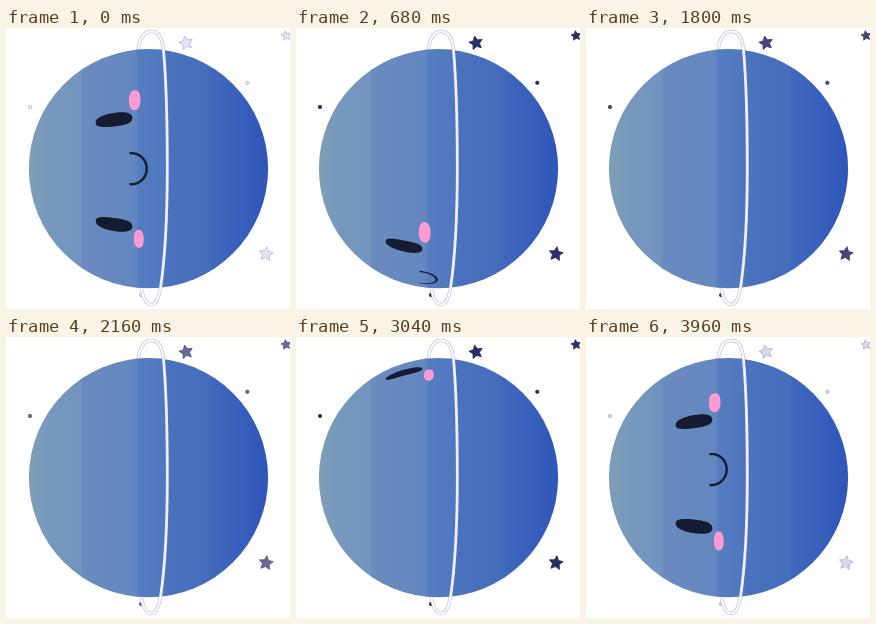
Write an HTML page with a canvas that moves like this. It is 284x281 px and loops after 4000 ms.

```html
<!DOCTYPE html>
<html lang="en">
<head>
<meta charset="utf-8">
<title>Spinning planet</title>
<style>
html, body { margin: 0; width: 100%; height: 100%; overflow: hidden; background: #fff; }
canvas { display: block; width: 284px; height: 281px; }
</style>
</head>
<body>
<canvas id="stage"></canvas>
<script>
const W = 284, H = 281, LOOP = 4000, STEP = 40;
const CX = 142.5, CY = 140.7, R = 119.6;
const INK = '#151b30', PINK = '#ff9bd0';
const RAD = Math.PI / 180;

const canvas = document.getElementById('stage');
const dpr = window.devicePixelRatio || 1;
canvas.width = W * dpr;
canvas.height = H * dpr;
const ctx = canvas.getContext('2d');
ctx.scale(dpr, dpr);

const skin = ctx.createLinearGradient(CX - R, 0, CX + R, 0);
[[23, '#7f9fb6'], [40, '#7799bc'], [74, '#7094be'], [77, '#6a8bbf'],
 [129, '#6387bf'], [133, '#567cc0'], [157, '#5078bf'], [161, '#4b72bd'],
 [203, '#466dbc'], [207, '#4068bc'], [235, '#385fbb'], [262, '#2f55b8']]
  .forEach(([x, color]) => skin.addColorStop(Math.max(0, Math.min(1, (x - CX + R) / (2 * R))), color));

// Closed loop of the ring and its near side.
const ringLoop = new Path2D('M132 22C134 9 138 3.5 145 3.5C153 3.5 156 10 157.5 22' +
  'C160 50 161.3 90 161.3 140C161.3 190 159 230 154.5 260' +
  'C152.5 271 149 276.5 145.5 276.5C140 276.5 137 270 135.3 260');
const ringFront = new Path2D('M157.5 22C160 50 161.3 90 161.3 140C161.3 190 159 230 154.5 260');

// x, y, outer radius, tilt in degrees
const stars = [
  [180, 15, 7.6, -12], [280, 7.7, 5.4, -8], [260, 226, 7.8, 8]
];
const dots = [[24, 79], [241.3, 54.8], [135, 267]];

function mix(a, b, k) {
  return `rgb(${a.map((v, i) => Math.round(v + (b[i] - v) * k))})`;
}

// Points are [x, angle around the horizontal axis]; hidden ones rest on the limb.
function wrap(points, turn, color) {
  ctx.beginPath();
  for (const [x, angle] of points) {
    const a = Math.max(-90, Math.min(90, angle + turn));
    const r = Math.sqrt(R * R - (x - CX) ** 2);
    ctx.lineTo(x, CY + r * Math.sin(a * RAD));
  }
  ctx.closePath();
  ctx.fillStyle = color;
  ctx.fill();
}

function blob(x, angle, rx, ra, power) {
  const soft = v => Math.sign(v) * Math.abs(v) ** (2 / power);
  return Array.from({ length: 60 }, (_, i) => {
    const t = i / 60 * 2 * Math.PI;
    return [x + rx * soft(Math.cos(t)), angle + ra * soft(Math.sin(t))];
  });
}

function smile() {
  const arc = (rx, ra) => Array.from({ length: 41 }, (_, i) => {
    const t = (i / 40 - 0.5) * Math.PI;
    return [125.5 + rx * Math.cos(t), ra * Math.sin(t)];
  });
  const outer = arc(16.4, 8.1), inner = arc(14, 6.95);
  return [[123.5, -8.1], ...outer, [123.5, 8.1], [123.5, 6.95], ...inner.reverse(), [123.5, -6.95]];
}

const face = [
  [blob(108, -25.4, 18.3, 3.75, 2.5), INK],
  [blob(108, 29.2, 18.3, 3.75, 2.5), INK],
  [blob(128.7, -35.4, 5.8, 5.9, 2.3), PINK],
  [blob(132.8, 36.2, 4.9, 5.4, 2.3), PINK],
  [smile(), INK]
];

function drawStars(time) {
  // A short flash every two seconds.
  const phase = time % 2000;
  const away = Math.min(phase, 2000 - phase);
  const glow = away < 260 ? (1 + Math.cos(Math.PI * away / 260)) / 2 : 0;
  ctx.fillStyle = mix([43, 47, 105], [229, 227, 244], glow);
  ctx.strokeStyle = mix([35, 39, 94], [184, 178, 219], glow);
  ctx.lineWidth = 0.8;
  ctx.lineJoin = 'round';
  for (const [x, y, size, tilt] of stars) {
    ctx.beginPath();
    for (let i = 0; i < 10; i++) {
      const r = i % 2 ? size * 0.46 : size * 0.94;
      const a = (tilt - 90 + i * 36) * RAD;
      ctx.lineTo(x + r * Math.cos(a), y + r * Math.sin(a));
    }
    ctx.closePath();
    ctx.fill();
    ctx.stroke();
  }
  for (const [x, y] of dots) {
    ctx.beginPath();
    ctx.arc(x, y, 1.7, 0, 2 * Math.PI);
    ctx.fill();
    ctx.stroke();
  }
}

function strokePath(path, color, width) {
  ctx.strokeStyle = color;
  ctx.lineWidth = width;
  ctx.stroke(path);
}

function draw(time) {
  ctx.fillStyle = '#fff';
  ctx.fillRect(0, 0, W, H);
  drawStars(time);

  strokePath(ringLoop, '#c3c0e6', 3.4);
  strokePath(ringLoop, '#fff', 1.9);

  ctx.beginPath();
  ctx.arc(CX, CY, R, 0, 2 * Math.PI);
  ctx.fillStyle = skin;
  ctx.fill();

  // A tenth of a degree per millisecond; the jump happens on the far side.
  const turn = (time < LOOP / 2 ? time : time - LOOP) * 0.1;
  for (const [points, color] of face) wrap(points, turn, color);

  strokePath(ringFront, '#f1effb', 2.8);
}

const start = performance.now();
function tick() {
  const time = (performance.now() - start) % LOOP;
  draw(Math.floor(time / STEP) * STEP);
  requestAnimationFrame(tick);
}
tick();
</script>
</body>
</html>
```
